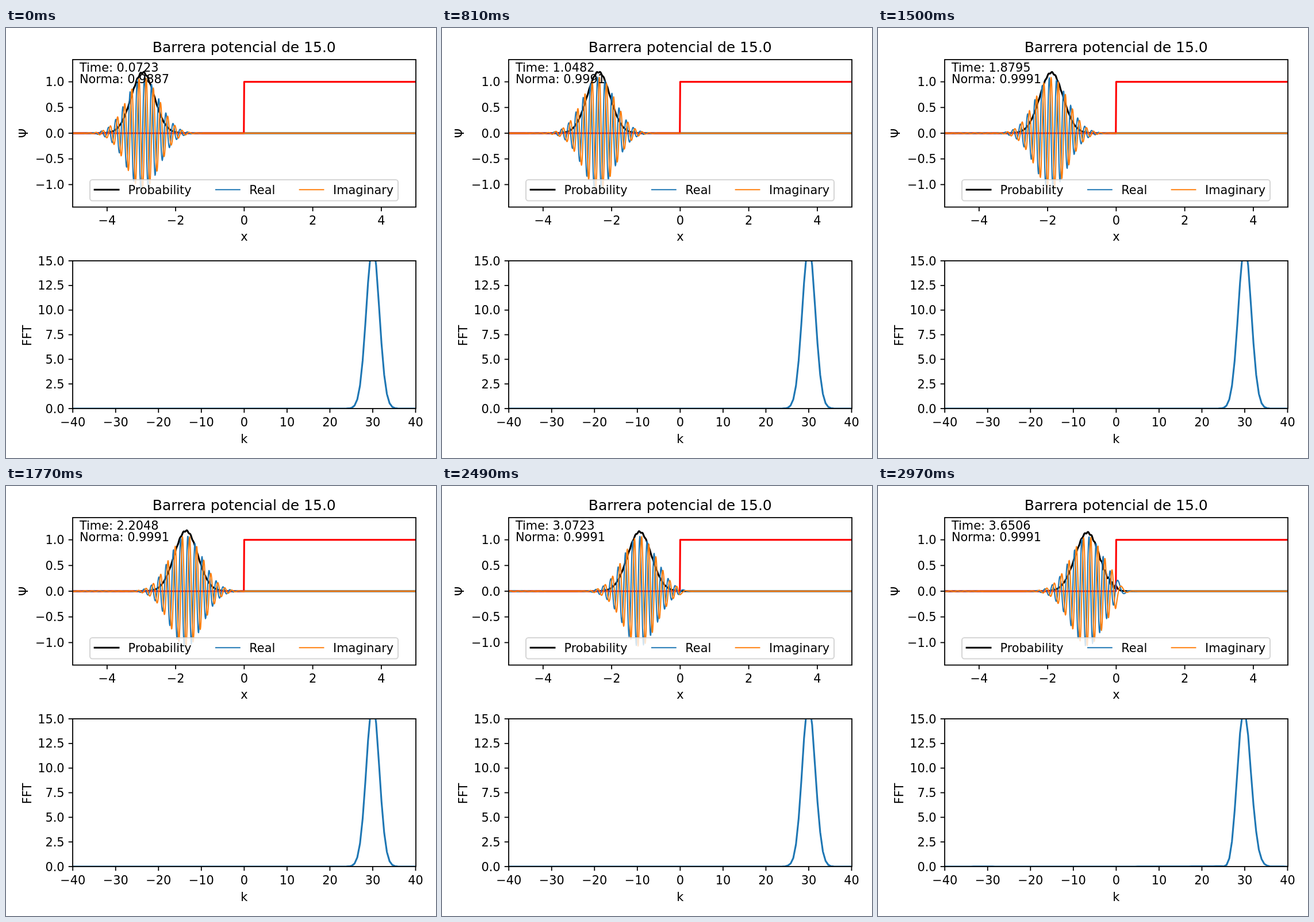
An HTML page with a canvas that plays this animation: 748x748 px, repeating every 3000 ms.

```html
<!DOCTYPE html>
<html lang="es">
<head>
<meta charset="utf-8">
<title>Barrera potencial</title>
<style>
html, body { margin: 0; width: 100%; height: 100%; overflow: hidden; background: #fff; }
canvas { display: block; }
</style>
</head>
<body>
<canvas id="stage" width="748" height="748"></canvas>
<script>
const ctx = document.getElementById('stage').getContext('2d');
const BLUE = '#1f77b4', ORANGE = '#ff7f0e', THICK = 3.125, THIN = 2.08;
const LEFT = 116, RIGHT = 713, FONT = 20.83;
const N = 1000, DX = 0.01, FRAMES = 100, STEPS = 15, DT = 1 / 415;
const BARRIER = 7.5, KINETIC = 0.01 / DX ** 2;

const px = x => 414.35 + 59.63 * x;
const py = y => 183 - 89.4 * y;
const kx = k => 414.35 + 7.454 * k;
const ky = p => 662 - 17.13 * p;
const xs = Array.from({ length: N }, (_, j) => -5 + j * DX);

// Leapfrog Schrödinger solver: real and imaginary parts advance in turn.
function simulate() {
  const envelope = x => Math.sqrt(1.1968) * Math.exp(-2.25 * (x + 3) ** 2);
  const re = Float64Array.from(xs, x => envelope(x) * Math.cos(30 * x));
  const im = Float64Array.from(xs, x => envelope(x) * Math.sin(30 * x));
  const advance = (to, from, dt) => {
    for (let j = 1; j < N - 1; j++) {
      const v = j >= N / 2 ? BARRIER : 0;
      to[j] += dt * (KINETIC * (2 * from[j] - from[j - 1] - from[j + 1]) + v * from[j]);
    }
  };
  const states = [];
  for (let s = 1; s <= (FRAMES + 1) * STEPS; s++) {
    advance(re, im, DT);
    advance(im, re, -DT);
    if (s % STEPS === 0 && s > STEPS) states.push({ re: re.slice(), im: im.slice() });
  }
  return states;
}

const cosT = Float64Array.from(xs, (_, j) => Math.cos(2 * Math.PI * j / N));
const sinT = Float64Array.from(xs, (_, j) => Math.sin(2 * Math.PI * j / N));

function spectrum({ re, im }) {
  const points = [];
  for (let n = -65; n <= 65; n++) {
    let a = 0, b = 0;
    for (let j = 0; j < N; j++) {
      const q = ((n * j) % N + N) % N;
      a += re[j] * cosT[q] + im[j] * sinT[q];
      b += im[j] * cosT[q] - re[j] * sinT[q];
    }
    points.push([kx(n * 2 * Math.PI / (N * DX)), ky((a * a + b * b) / N)]);
  }
  return points;
}

function line(points, color, width, cap = 'square') {
  ctx.beginPath();
  for (const [x, y] of points) ctx.lineTo(x, y);
  ctx.strokeStyle = color;
  ctx.lineWidth = width;
  ctx.lineCap = cap;
  ctx.lineJoin = 'round';
  ctx.stroke();
}

function text(s, x, y, align = 'left', size = FONT) {
  ctx.font = `${size}px "DejaVu Sans", sans-serif`;
  ctx.textAlign = align;
  ctx.fillStyle = '#000';
  ctx.fillText(s, x, y);
}

function sideText(s, x, y) {
  ctx.save();
  ctx.translate(x, y);
  ctx.rotate(-Math.PI / 2);
  text(s, 0, 0, 'center');
  ctx.restore();
}

function clipped(top, bottom, paint) {
  ctx.save();
  ctx.beginPath();
  ctx.rect(LEFT, top, RIGHT - LEFT, bottom - top);
  ctx.clip();
  paint();
  ctx.restore();
}

const label = (v, digits) => v.toFixed(digits).replace('-', '\u2212');

function axes(top, bottom, xTicks, toX, yTicks, toY) {
  ctx.strokeStyle = '#000';
  ctx.lineWidth = 1.8;
  ctx.lineJoin = 'miter';
  ctx.strokeRect(LEFT, top, RIGHT - LEFT, bottom - top);
  for (const v of xTicks) {
    const x = toX(v);
    line([[x, bottom], [x, bottom + 7.3]], '#000', 1.8, 'butt');
    text(label(v, 0), x, bottom + 30.8, 'center');
  }
  for (const v of yTicks) {
    const y = toY(v);
    line([[LEFT - 7.3, y], [LEFT, y]], '#000', 1.8, 'butt');
    text(label(v, 1), 101.6, y + 7.6, 'right');
  }
}

function legend() {
  ctx.beginPath();
  ctx.roundRect(146, 264, 536, 36.5, 4.2);
  ctx.fillStyle = 'rgba(255,255,255,0.8)';
  ctx.fill();
  ctx.strokeStyle = 'rgba(204,204,204,0.8)';
  ctx.lineWidth = THIN;
  ctx.stroke();
  const items = [['Probability', 154.2, '#000', THICK], ['Real', 365, BLUE, THIN], ['Imaginary', 510.7, ORANGE, THIN]];
  for (const [name, x, color, width] of items) {
    line([[x, 281.3], [x + 41.7, 281.3]], color, width);
    text(name, x + 58.3, 289);
  }
}

// The norm starts with a short damped ripple.
const norm = t => 0.99912 - 0.0106 * Math.sin(17.9 * t + 0.115) * Math.exp(-1.57 * t * t);

function draw(frame) {
  const state = states[frame], { re, im } = state;
  const t = (frame + 2) * STEPS * DT, total = norm(t);
  const curve = f => xs.map((x, j) => [px(x), py(f(j))]);
  ctx.fillStyle = '#fff';
  ctx.fillRect(0, 0, 748, 748);

  clipped(55, 311.5, () => {
    line(curve(j => total * (re[j] ** 2 + im[j] ** 2)), '#000', THICK);
    line(curve(j => j >= N / 2 ? 1 : 0), '#f00', THICK);
    line(curve(j => re[j]), BLUE, THIN);
    line(curve(j => im[j]), ORANGE, THIN);
  });
  axes(55, 311.5, [-4, -2, 0, 2, 4], px, [-1, -0.5, 0, 0.5, 1], py);
  text('Barrera potencial de 15.0', 414.3, 42.3, 'center', 25);
  text('Time: ' + t.toFixed(4), 128, 75.5);
  text('Norma: ' + total.toFixed(4), 128, 95.5);
  legend();
  text('x', 414.3, 370, 'center');
  sideText('Ψ', 38, 183);

  clipped(405, 662, () => line(spectrum(state), BLUE, THICK));
  axes(405, 662, [-40, -30, -20, -10, 0, 10, 20, 30, 40], kx, [0, 2.5, 5, 7.5, 10, 12.5, 15], ky);
  text('k', 414.3, 721.5, 'center');
  sideText('FFT', 44, 535);
}

const states = simulate();
const start = performance.now();
let shown = -1;
function tick() {
  const frame = Math.floor((performance.now() - start) / 30) % FRAMES;
  if (frame !== shown) draw(shown = frame);
  requestAnimationFrame(tick);
}
tick();
</script>
</body>
</html>
```
